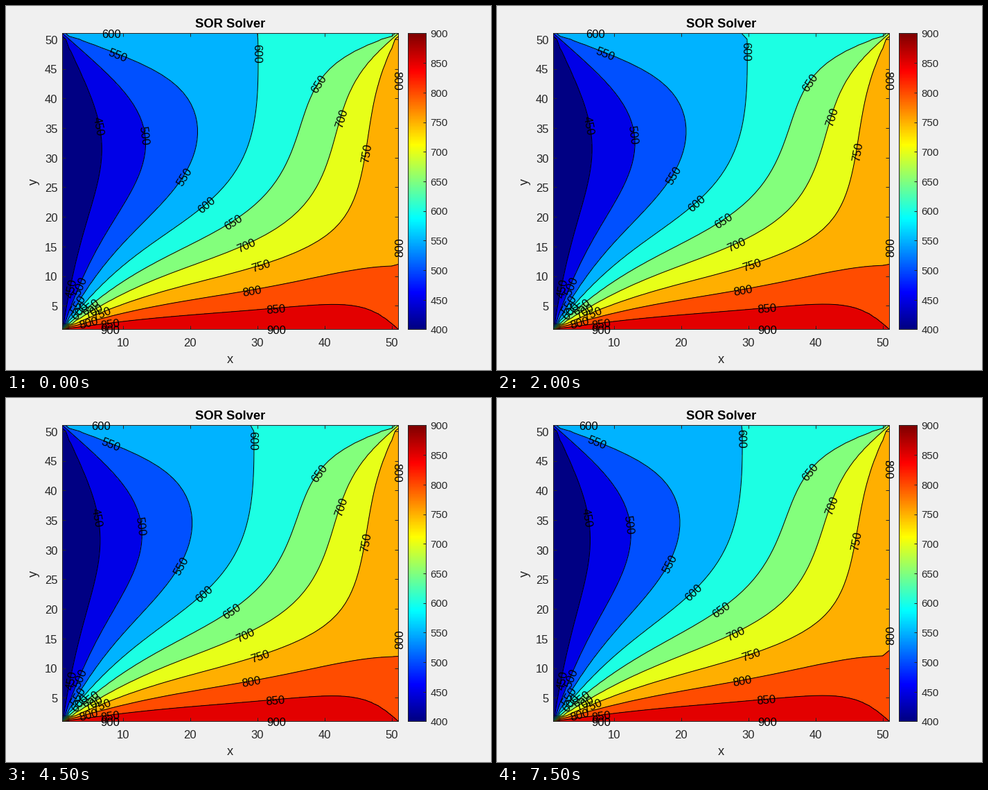
Write a matplotlib script that moves like this. It is 700 px wide and 525 px high and loops after 8000 ms.

```python
import numpy as np
import matplotlib.pyplot as plt
from matplotlib.animation import FuncAnimation
from matplotlib.colors import ListedColormap

W, H, DPI = 700, 525, 100
FRAMES, INTERVAL = 16, 500
N = 51
X0, X1, Y0, Y1 = 81.4, 566.4, 39.4, 466.4       # plot box in pixels
SCALE = np.array([X1 - X0, Y1 - Y0]) / (N - 1)  # pixels per cell
INK = "0.15"
SPACING = 240                                   # pixels between labels
DROP = 6.8                                      # baseline below the line

plt.rcParams["font.family"] = "Liberation Sans"


def pt(px):
    return px * 72 / DPI


def jet(k):
    ramp = 4 * (np.asarray(k) + 1) / 256
    return np.stack([np.clip(1.5 - abs(ramp - c), 0, 1) for c in (3, 2, 1)], -1)


def steady_state():
    """Laplace solution on the grid, found with a sine transform."""
    u = np.zeros((N, N))
    u[:, 0], u[:, -1] = 400, 800
    u[0], u[-1] = 900, 600
    load = np.zeros((N - 2, N - 2))
    load[:, 0] += u[1:-1, 0]
    load[:, -1] += u[1:-1, -1]
    load[0] += u[0, 1:-1]
    load[-1] += u[-1, 1:-1]
    k = np.arange(1, N - 1)
    S = np.sqrt(2 / (N - 1)) * np.sin(np.pi * np.outer(k, k) / (N - 1))
    lam = 2 - 2 * np.cos(np.pi * k / (N - 1))
    u[1:-1, 1:-1] = S @ (S @ load @ S / (lam[:, None] + lam)) @ S
    # Corners take the mean of the two walls that meet there
    for j in (0, -1):
        for i in (0, -1):
            u[j, i] = (u[j, N // 2] + u[N // 2, i]) / 2
    return u


# Slowest error mode, tilted along the sweep direction
t = np.linspace(0, 1, N)
tilt = np.sin(np.pi * t) * np.exp(-0.14 * t)
tilt[[0, -1]] = 0
mode = 83.7 * np.outer(tilt, tilt)
steady = steady_state()


def field(step):
    return steady - mode * np.exp(-0.0097 * step)


fig = plt.figure(figsize=(W / DPI, H / DPI), dpi=DPI, facecolor="#f0f0f0")


def box(x0, y0, x1, y1):
    ax = fig.add_axes([x0 / W, 1 - y1 / H, (x1 - x0) / W, (y1 - y0) / H])
    for spine in ax.spines.values():
        spine.set(color=INK, linewidth=pt(1))
    return ax


def write(x, y, s, px, ha="center", color=INK, **kw):
    fig.text(x / W, 1 - y / H, s, fontsize=pt(px), ha=ha, va="baseline",
             color=color, **kw)


ax = box(X0, Y0, X1, Y1)
ax.set(xticks=range(10, 51, 10), yticks=range(5, 51, 5))
ax.set_axisbelow(False)
ax.tick_params(direction="in", top=True, right=True, length=pt(5),
               width=pt(1), color=INK, labelbottom=False, labelleft=False)
for v in range(10, 51, 10):
    write(X0 + (v - 1) * SCALE[0], 491, str(v), 16.67)
for v in range(5, 51, 5):
    write(74.5, Y1 - (v - 1) * SCALE[1] + 6.8, str(v), 16.67, "right")

cax = box(580.4, Y0, 606.4, Y1)
cax.imshow(np.arange(256)[:, None], cmap=ListedColormap(jet(np.arange(256))),
           origin="lower", aspect="auto", extent=(0, 1, 400, 900))
cax.set(xticks=[], yticks=range(400, 901, 50))
cax.tick_params(direction="in", left=False, right=True, length=pt(4),
                width=pt(1), color=INK, labelleft=False)
for v in range(400, 901, 50):
    write(612.5, Y1 - (v - 400) / 500 * (Y1 - Y0) + 5.8, str(v), 15, "left")

write((X0 + X1) / 2, 31, "SOR Solver", 18.33, color="black", weight="bold")
write(323.5, 515, "x", 18.33)
write(45, 253, "y", 18.33, rotation=90, rotation_mode="anchor")

# Distance of the first label along each contour, in pixels
first = {450: 54, 500: 63, 550: 40, 600: 35, 650: 52,
         700: 51, 750: 58, 800: 34, 850: 62, 900: 59}
EPS = 1e-4                                      # boundary counts as inside
lines = np.array(list(first)) - EPS
bands = [0, *lines[:-1], 2000]
fills = jet((np.arange(10) * 25.6).astype(int))
axis = np.arange(1, N + 1)
drawn = []


def add_labels(level, seg):
    path = (seg - 1) * SCALE
    if np.hypot(*path[0]) > np.hypot(*path[-1]):
        path = path[::-1]
    s = np.r_[0, np.cumsum(np.hypot(*np.diff(path, axis=0).T))]

    def at(d):
        return np.array([np.interp(d, s, path[:, i]) for i in (0, 1)])

    for d in np.arange(first[level], s[-1] - 14, SPACING):
        dx, dy = at(d + 14) - at(d - 14)
        angle = (np.degrees(np.arctan2(dy, dx)) + 90) % 180 - 90
        if angle > 84 and at(d)[1] > (Y1 - Y0) / 2:
            angle -= 180
        a = np.radians(angle)
        x, y = 1 + (at(d) + DROP * np.array([np.sin(a), -np.cos(a)])) / SCALE
        drawn.append(ax.text(x, y, str(level), fontsize=pt(16.67),
                             color="black", rotation=angle, ha="center",
                             va="baseline", rotation_mode="anchor", zorder=5))


def draw(step):
    while drawn:
        drawn.pop().remove()
    u = field(step)
    drawn.append(ax.contourf(axis, axis, u, levels=bands, colors=fills))
    cs = ax.contour(axis, axis, u, levels=lines, colors="black",
                    linewidths=pt(1))
    drawn.append(cs)
    for level, segs in zip(first, cs.allsegs):
        if len(segs):
            add_labels(level, max(segs, key=len))
    ax.set(xlim=(1, N), ylim=(1, N))
    return drawn


anim = FuncAnimation(fig, draw, frames=FRAMES, init_func=lambda: [],
                     interval=INTERVAL, repeat=True, repeat_delay=0)
plt.show()
```
